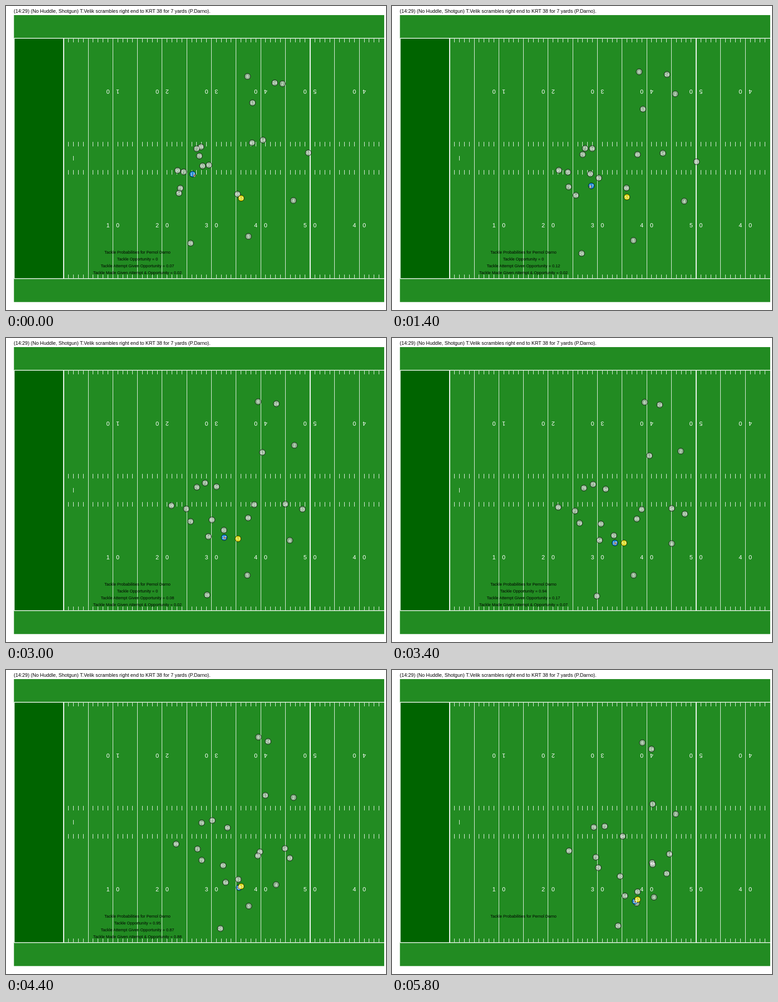
Animation of 837x669 px, one loop 6000 ms. Source, as an HTML page:

```html
<!DOCTYPE html>
<html lang="en">
<head>
<meta charset="utf-8">
<title>Tackle probabilities</title>
<style>
html, body { margin: 0; width: 100%; height: 100%; overflow: hidden; background: #fff; }
svg { display: block; font-family: "Liberation Sans", Arial, sans-serif; text-anchor: middle; }
.turf { fill: #228b22; }
.chalk { stroke: #fff; fill: none; }
.yards { fill: #fff; font-size: 13px; }
.label { fill: #fff; font-size: 9px; }
.info { font-size: 9px; }
.dot { stroke: #000; stroke-opacity: .8; stroke-width: 1; }
</style>
</head>
<body>
<svg width="837" height="669" viewBox="0 0 837 669">
  <text x="17" y="14.5" font-size="10.9" text-anchor="start">(14:29) (No Huddle, Shotgun) T.Velik scrambles right end to KRT 38 for 7 yards (P.Darno).</text>
  <g id="field"></g>
  <g id="play"></g>
</svg>
<script>
const STEP = 200, LOOP = 6000, LAST = 5.8;
const GOAL = 126.8, YARD = 10.856;
const field = document.getElementById('field');
const play = document.getElementById('play');

const rect = (x, y, w, h, attrs) => `<rect x="${x}" y="${y}" width="${w}" height="${h}" ${attrs}/>`;
const text = (x, y, s, cls, extra = '') => `<text x="${x}" y="${y}" class="${cls}" ${extra}>${s}</text>`;

function drawField() {
  let thin = 'M148.5 330V340', bold = '', numbers = '';
  for (let yard = 0; yard < 65; yard++) {
    const exact = GOAL + yard * YARD, x = Math.floor(exact) + .5;
    if (yard % 50 === 0) bold += `M${Math.round(exact)} 71V600`;
    else if (yard % 5 === 0) thin += `M${x} 71V600`;
    else thin += `M${x} 72v8m0 219v10m0 52v10m0 220v8`;
    if (yard && yard % 10 === 0) {
      const digit = (yard > 50 ? 100 - yard : yard) / 10;
      for (const [nx, low, high] of [[exact - YARD, digit, 0], [exact + YARD, 0, digit]]) {
        numbers += text(nx, 487, low, 'yards')
          + text(nx, 192.5, high, 'yards', `transform="rotate(180 ${nx} 188)"`);
      }
    }
  }
  field.innerHTML = rect(17.5, 20, 815.5, 631.5, 'class="turf"')
    + rect(19, 72, 107, 527, 'fill="#006400"')
    + `<path class="chalk" d="${thin}"/>`
    + `<path class="chalk" stroke-width="2.2" d="${bold}"/>`
    + '<path class="chalk" stroke-width="1.5" d="M18 71H833M18 600H833M18.2 71V600"/>'
    + numbers;
}

// Everyone speeds up off the snap and slows into the tackle.
const progress = t => t / LAST - .04 * Math.sin(2 * Math.PI * t / LAST);

// Smooth curve through evenly spaced key points, s from 0 to 1.
function along(points, s) {
  const p = s * (points.length - 1);
  const weight = i => points.reduce((w, _, j) => i === j ? w : w * (p - j) / (i - j), 1);
  return [0, 1].map(k => points.reduce((sum, pt, i) => sum + pt[k] * weight(i), 0));
}

const players = [];
const player = (label, fill, ...points) => players.push({ label, fill, points });
const grey = (label, ...points) => player(label, 'rgba(190,190,190,.67)', ...points);

grey(6, [532, 155], [555, 140], [551.5, 160]);
grey(24, [592, 169], [605, 145], [585.5, 149.5], [571.5, 174]);
grey(2, [609, 171], [635, 233], [625, 317]);
grey(13, [543, 213], [564, 250], [574, 295]);
grey(14, [566, 295], [608, 342], [616, 381], [611, 405]);
grey(45, [542, 301], [546, 364], [573, 424]);
grey(33, [666, 323], [666.5, 356], [639, 395], [605, 448]);
grey(94, [429.5, 310], [462, 326], [508, 366]);
grey(73, [420, 314], [437.5, 318.5], [468.5, 344]);
grey(76, [426, 330], [420, 328], [444.5, 346]);
grey(91, [447, 350], [478, 420], [541, 488]);
grey(60, [433, 352], [452, 398], [502.5, 454]);
grey(99, [378, 362], [364, 368], [390, 398]);
grey(71, [391.5, 365], [396, 375], [449, 412]);
grey(79, [384, 401], [405, 403], [454.5, 435]);
grey(54, [381, 412], [443, 435], [513, 497]);
grey(88, [510, 414], [532, 395.5], [574, 428]);
grey(4, [633, 428], [640, 434], [609.5, 458], [577, 500]);
grey(5, [534, 507], [531.5, 522], [539, 513]);
grey(26, [406.5, 522], [441, 564.5], [498, 563]);
player(17, '#1a86d4', [411, 370], [478, 436], [535.5, 509]);
const runner = players[players.length - 1];
player(53, '#d4d40c', [518, 423], [514.5, 426], [512, 458.5], [541, 505]);

const sigmoid = x => 1 / (1 + Math.exp(-x));
const chances = [
  ['Tackle Opportunity', t => t < 3.4 ? 0 : .91 + .01 * t],
  ['Tackle Attempt Given Opportunity',
    t => .07 + .05 * Math.exp(-(((t - 1.4) / .5) ** 2)) + .81 * sigmoid(6 * (t - 3.73))],
  ['Tackle Made Given Attempt &amp; Opportunity', t => .02 + .87 * sigmoid(7 * (t - 3.79))],
];

function drawPlay(t) {
  const s = progress(t);
  let dots = '', labels = '';
  function mark(x, y, r, fill, label) {
    dots += `<circle class="dot" cx="${x}" cy="${y}" r="${r}" fill="${fill}"/>`;
    labels += text(x, y + 3.2, label, 'label');
  }
  for (const { label, fill, points } of players) {
    const [x, y] = along(points, s);
    mark(x, y, 6.6, fill, label);
    // The ball swings from one arm to the other, then is tucked in.
    if (points === runner.points) {
      const swing = 4 * Math.exp(-t / 3);
      mark(x + swing * Math.cos(2 * t), y + swing * .8, 2.6, '#7b4a3a', 0);
    }
  }
  let info = text(289.5, 545, 'Tackle Probabilities for Pernol Darno', 'info');
  if (t < LAST) chances.forEach(([name, chance], i) => {
    info += text(289.5, 560 + 15 * i, `${name} = ${+chance(t).toFixed(2)}`, 'info');
  });
  play.innerHTML = dots + labels + info;
}

let shown = -1;
function tick() {
  const step = Math.floor(performance.now() % LOOP / STEP);
  if (step !== shown) drawPlay((shown = step) * STEP / 1000);
  requestAnimationFrame(tick);
}
drawField();
tick();
</script>
</body>
</html>
```
